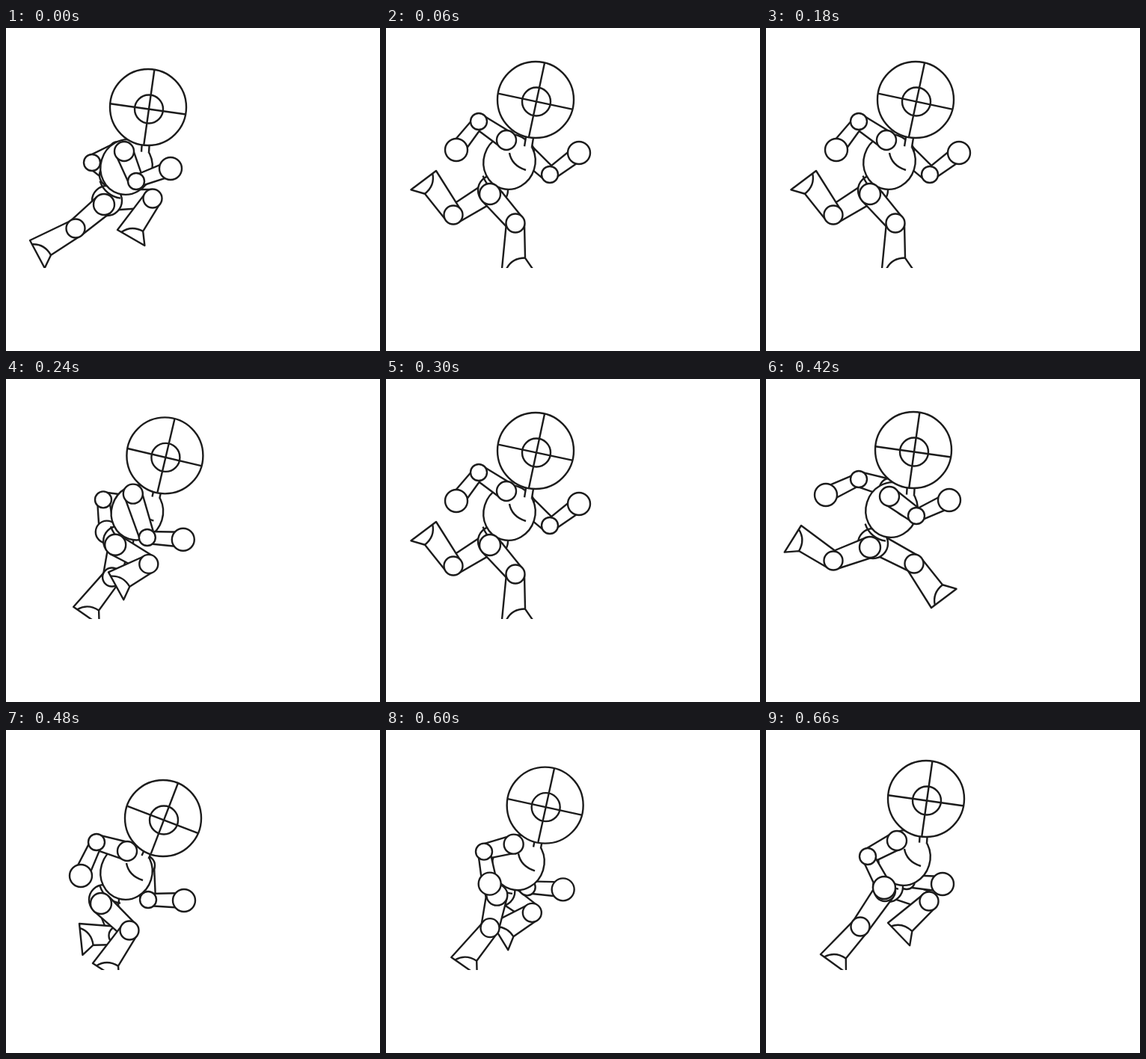
An HTML page with a canvas that plays this animation: 500x432 px, repeating every 720 ms.

```html
<!DOCTYPE html>
<html>
<head>
<meta charset="utf-8">
<title>Running figure</title>
<style>
  html, body { margin: 0; width: 100%; height: 100%; overflow: hidden; background: #fff; }
  canvas { display: block; filter: blur(0.5px); }
</style>
</head>
<body>
<canvas id="stage" width="500" height="432"></canvas>
<script>
const ctx = document.getElementById('stage').getContext('2d');
const STEP = 60;

// arm: shoulder, elbow, hand; leg: knee, heel, sole angle in degrees
const push = {
  head: [190, 106, 8], chest: [161, 186], hip: [131, 236],
  nearArm: [158, 165, 174, 205, 220, 188], farArm: [150, 165, 115, 180, 140, 197],
  nearLeg: [93, 268, 32, 284, 62], farLeg: [196, 228, 149, 270, 30]
};
const land = {
  head: [200, 96, 12], chest: [165, 179], hip: [139, 222],
  nearArm: [161, 150, 124, 125, 94, 163], farArm: [185, 165, 219, 196, 258, 167],
  nearLeg: [173, 261, 155, 322, 2], farLeg: [90, 250, 67, 191, 143]
};
const fly = {
  head: [197, 95, 8], chest: [168, 175], hip: [139, 225],
  nearArm: [165, 157, 201, 183, 245, 162], farArm: [165, 146, 124, 134, 80, 155],
  nearLeg: [90, 243, 47, 196, 122], farLeg: [198, 247, 221, 306, -37]
};
const crouch = {
  head: [210, 118, 21], chest: [161, 190], hip: [127, 232],
  nearArm: [162, 162, 121, 150, 100, 195], farArm: [186, 181, 190, 227, 238, 228],
  nearLeg: [165, 268, 116, 312, 33], farLeg: [150, 275, 98, 259, 84]
};
const lift = {
  head: [214, 92, 8], chest: [185, 171], hip: [159, 215],
  nearArm: [175, 148, 136, 169, 158, 211], farArm: [195, 165, 188, 202, 236, 206],
  nearLeg: [126, 263, 73, 300, 36], farLeg: [218, 229, 163, 258, 46]
};

function mix(a, b, k) {
  const pose = {};
  for (const part in a) pose[part] = a[part].map((v, i) => v + (b[part][i] - v) * k);
  return pose;
}

function swapSides(p) {
  return {
    ...p,
    nearArm: [...p.nearArm.slice(0, 2), ...p.farArm.slice(2)],
    farArm: [...p.farArm.slice(0, 2), ...p.nearArm.slice(2)],
    nearLeg: p.farLeg,
    farLeg: p.nearLeg
  };
}

const cycle = [
  push, land, swapSides(crouch), land, swapSides(mix(crouch, lift, 0.6)), land,
  mix(push, fly, 0.5), fly, crouch, mix(crouch, lift, 1 / 3), mix(crouch, lift, 2 / 3), lift
];

function path(points, closed) {
  ctx.beginPath();
  points.forEach(([x, y]) => ctx.lineTo(x, y));
  if (closed) ctx.closePath();
}

function circle(x, y, r) {
  ctx.beginPath();
  ctx.arc(x, y, r, 0, 7);
  ctx.fill();
  ctx.stroke();
}

function bone(ax, ay, bx, by, wa, wb) {
  const d = Math.hypot(bx - ax, by - ay) || 1;
  const nx = (ay - by) / d, ny = (bx - ax) / d;
  const sides = [1, -1].map(s => [
    [ax + s * nx * wa, ay + s * ny * wa],
    [bx + s * nx * wb, by + s * ny * wb]
  ]);
  path([...sides[0], sides[1][1], sides[1][0]]);
  ctx.fill();
  for (const side of sides) {
    path(side);
    ctx.stroke();
  }
}

function arm([sx, sy, ex, ey, hx, hy]) {
  bone(sx, sy, ex, ey, 12, 10);
  bone(ex, ey, hx, hy, 8, 10);
  circle(sx, sy, 13);
  circle(ex, ey, 11);
  circle(hx, hy, 15);
}

function leg(hx, hy, [kx, ky, px, py, degrees]) {
  const a = degrees * Math.PI / 180, c = Math.cos(a), s = Math.sin(a);
  const at = (u, v) => [px + u * c + v * s, py + u * s - v * c];
  const toe = at(42, 0), instep = at(30.5, 15.5);
  const mx = (px + instep[0]) / 2 - kx, my = (py + instep[1]) / 2 - ky;
  const d = Math.hypot(mx, my);
  const nx = -my / d * 12, ny = mx / d * 12;
  const side = Math.sign((px - kx) * nx + (py - ky) * ny) || 1;

  bone(hx, hy, kx, ky, 14, 12);
  path([
    [kx + side * nx, ky + side * ny], [px, py], toe, instep,
    [kx - side * nx, ky - side * ny]
  ], true);
  ctx.fill();
  ctx.stroke();
  ctx.beginPath();
  ctx.moveTo(...at(6, 0));
  ctx.quadraticCurveTo(...at(13, 15), ...instep);
  ctx.stroke();
  circle(kx, ky, 12.5);
}

function torso([x, y], [hx, hy]) {
  circle(hx + 4, hy - 5, 20);
  ctx.beginPath();
  ctx.ellipse(x - 3, y + 6, 34, 36, 0.3, 1.4, 2.5);
  ctx.stroke();
  ctx.beginPath();
  ctx.ellipse(x, y, 34.5, 37, 0.3, 0, 7);
  ctx.fill();
  ctx.stroke();
  ctx.beginPath();
  ctx.moveTo(x, y - 12);
  ctx.quadraticCurveTo(x + 3, y + 5, x + 22, y + 11);
  ctx.stroke();
}

function head([x, y, tilt]) {
  circle(x, y, 51);
  circle(x + 1, y + 2.5, 19);
  ctx.save();
  ctx.translate(x + 1, y + 2.5);
  ctx.rotate(tilt * Math.PI / 180);
  path([[-52, 0], [50, 0]]);
  ctx.stroke();
  path([[0, -53], [0, 48]]);
  ctx.stroke();
  ctx.restore();
}

function draw(p) {
  const [hx, hy] = p.hip;
  ctx.fillStyle = '#fff';
  ctx.fillRect(0, 0, 500, 432);
  ctx.save();
  ctx.beginPath();
  ctx.rect(0, 0, 500, 321);
  ctx.clip();
  ctx.strokeStyle = '#1c1c1c';
  ctx.lineWidth = 2.4;
  ctx.lineJoin = 'round';
  leg(hx + 6, hy - 6, p.farLeg);
  arm(p.farArm);
  torso(p.chest, p.hip);
  bone(p.head[0], p.head[1], p.chest[0] + 25, p.chest[1] - 20, 5, 5);
  leg(hx, hy, p.nearLeg);
  circle(hx, hy, 14);
  head(p.head);
  arm(p.nearArm);
  ctx.restore();
}

function tick() {
  draw(cycle[Math.floor(performance.now() / STEP) % cycle.length]);
  requestAnimationFrame(tick);
}
tick();
</script>
</body>
</html>
```
